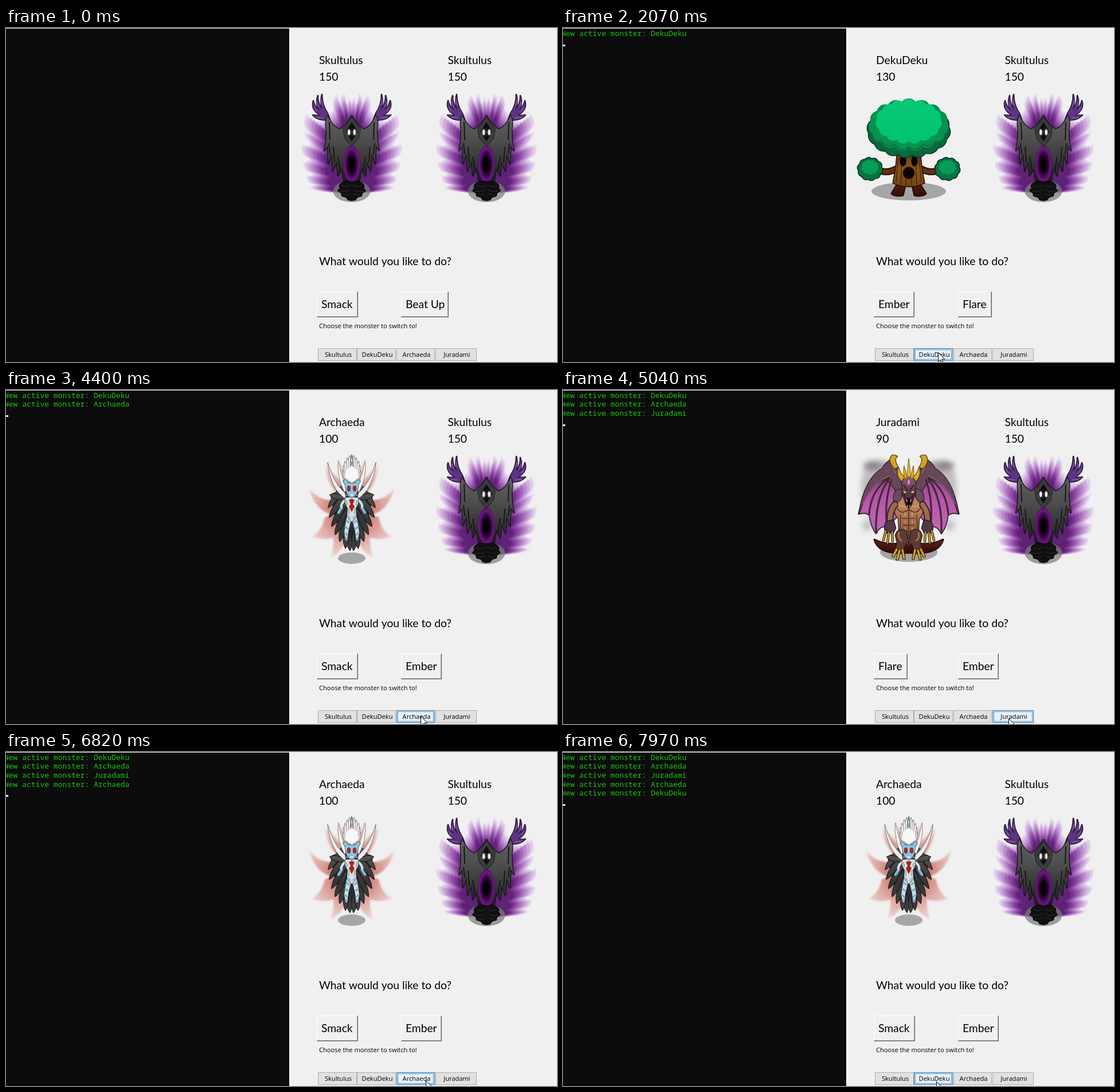
An HTML page with a canvas for the animation above (8000 ms loop, 961 by 583 pixels).

```html
<!DOCTYPE html>
<html lang="en">
<head>
<meta charset="utf-8">
<title>Monster battle</title>
<style>
html, body { margin: 0; width: 100%; height: 100%; overflow: hidden; background: #f0f0f0; }
canvas { display: block; }
</style>
</head>
<body>
<canvas id="stage" width="961" height="583"></canvas>
<script>
const ctx = document.getElementById('stage').getContext('2d');
const LOOP = 8000;
const UI = '19.25px Lato, Carlito, sans-serif';
const SMALL = '11.1px "Open Sans", "Noto Sans", sans-serif';
const MONO = '13px "Noto Sans Mono", "DejaVu Sans Mono", monospace';

const monsters = {
  Skultulus: { hp: 150, moves: [['Smack', 71], ['Beat Up', 82]] },
  DekuDeku: { hp: 130, moves: [['Ember', 70], ['Flare', 58]] },
  Archaeda: { hp: 100, moves: [['Smack', 71], ['Ember', 70]] },
  Juradami: { hp: 90, moves: [['Flare', 58], ['Ember', 70]] }
};

const tabs = [['Skultulus', 544, 68], ['DekuDeku', 612, 68], ['Archaeda', 681, 67], ['Juradami', 749, 72]];

// press, release (prints a line) and swap times
const picks = [
  ['DekuDeku', 690, 770, 920],
  ['Archaeda', 2760, 2840, 3010],
  ['Juradami', 4790, 4870, 5040],
  ['Archaeda', 6660, 6740, 6820],
  ['DekuDeku', 7890, 7970, 9000]
];

const blinks = [[5970, 6050], [7120, 7200]];

// time, x, y of the pointer
const pointer = [
  [70, 806, 582], [770, 657, 567], [920, 657, 567], [1140, 654, 566], [2070, 654, 566],
  [2460, 708, 571], [2610, 712, 571], [2840, 720, 569], [4320, 720, 569], [4870, 777, 573],
  [5890, 777, 573], [5970, 774, 572], [6430, 736, 573], [6660, 732, 573], [7120, 732, 573],
  [7890, 651, 575], [8000, 651, 575]
];

/* ---------- sprites ---------- */
let c;

// shape mirrored about the vertical axis, outline kept outside
function sym(d, fill, line, w = 1.6) {
  const half = new Path2D(d), p = new Path2D(d);
  p.addPath(half, new DOMMatrix([-1, 0, 0, 1, 0, 0]));
  c.lineJoin = c.lineCap = 'round';
  if (line) { c.strokeStyle = line; c.lineWidth = w * 2; c.stroke(p); }
  if (fill) { c.fillStyle = fill; c.fill(p); }
}

function strokes(d, color, w) { sym(d, null, color, w / 2); }

function oval(x, y, rx, ry, fill, line, w = 1.5) {
  c.beginPath();
  c.ellipse(x, y, rx, ry, 0, 0, 7);
  if (line) { c.strokeStyle = line; c.lineWidth = w * 2; c.stroke(); }
  c.fillStyle = fill;
  c.fill();
}

function ovals(x, ...rest) { oval(x, ...rest); oval(-x, ...rest); }

function ramp(y0, y1, ...colors) {
  const g = c.createLinearGradient(0, y0, 0, y1);
  colors.forEach((k, i) => g.addColorStop(i / (colors.length - 1), k));
  return g;
}

function glow(y, r, ...stops) {
  const g = c.createRadialGradient(0, y, 0, 0, y, r);
  stops.forEach(([at, k]) => g.addColorStop(at, k));
  return g;
}

// draws inside a frame scaled about (0, y)
function scaled(sx, sy, y, draw) {
  c.save();
  c.translate(0, y);
  c.scale(sx, sy);
  c.translate(0, -y);
  draw();
  c.restore();
}

// pointed leaf from a root to a tip
function leaf(x0, y0, x1, y1, w, fill, line) {
  const len = Math.hypot(x1 - x0, y1 - y0);
  const nx = (y0 - y1) / len * w, ny = (x1 - x0) / len * w;
  const mx = (x0 + x1 * 2) / 3, my = (y0 + y1 * 2) / 3;
  sym(`M${x0} ${y0}Q${mx + nx} ${my + ny} ${x1} ${y1}Q${mx - nx} ${my - ny} ${x0} ${y0}Z`, fill, line, .9);
}

// lumpy leaf mass
function cloud(x, y, rx, ry, n, r, fill, line) {
  const pass = (grow, color) => {
    oval(x, y, rx + grow, ry + grow, color);
    for (let i = 0; i < n; i++) {
      const a = (i + .25) / n * Math.PI * 2;
      oval(x + Math.cos(a) * rx, y + Math.sin(a) * ry, r + grow, r + grow, color);
    }
  };
  if (line) pass(1.6, line);
  pass(0, fill);
}

function blurred(px, draw) {
  c.save();
  c.filter = `blur(${px}px)`;
  draw();
  c.restore();
}

const art = {
  Skultulus() {
    const flame = 'M0 134Q-1 126 -5 121Q-4 128 -8 133Q-15 126 -12 115Q-22 122 -18 133Q-27 128 -25 117Q-36 128 -31 142L-46 160Q-65 168 -70 160Q-76 157 -77 151Q-90 169 -71 184Q-78 187 -82 180Q-81 193 -70 203Q-82 211 -86 203Q-90 223 -72 228Q-80 238 -84 234Q-84 253 -66 252Q-73 263 -78 258Q-77 275 -62 271Q-68 280 -74 277Q-68 287 0 287Z';
    const bands = ['#dfcbe9', '#ceaade', '#ba8bcb', '#a468b8', '#8d4ba3', '#763390', '#5e2276'];
    bands.forEach((color, i) => blurred(1, () =>
      scaled(1 - i * .072, 1 - i * .032, 287, () => sym(flame, color))));
    oval(0, 285, 32.5, 19, 'rgba(125,125,125,.72)');
    const claw = 'M-45 153Q-57 136 -52 116Q-52 135 -42 149ZM-47 154Q-66 138 -59 118Q-60 137 -43 150ZM-46 156Q-73 146 -67 127Q-64 143 -43 151ZM-38 160Q-58 163 -68 152Q-56 154 -42 149Z';
    sym(claw, '#5d3484', '#22142d', 1.3);
    strokes('M-53 127L-51 136M-61 129L-58 138M-65 139L-61 145M-61 156L-50 157', '#a075be', 1);
    sym('M0 153Q-9 170 -21 177Q-34 172 -42 153Q-47 160 -44 178Q-44 199 -48 214L-42 205L-41 237L-35 219L-33 250L-26 233L-24 258L-17 245L-13 270H0Z', ramp(153, 270, '#606060', '#505050', '#383838', '#191919'), '#161616', 1.4);
    strokes('M-39 165L-38 195M-40 202L-38 219M-32 208L-30 234M-24 225L-20 248', '#171717', 2);
    sym('M0 155Q-7 168 -15 176L-12 192L0 206Z', '#3c3c3c', '#202020', 1);
    sym('M0 164L-11 181L0 198Z', '#101010');
    blurred(1.5, () => ovals(-5, 182, 3.6, 6, '#666'));
    ovals(-4.8, 182, 2.1, 4.8, '#f4f4f4');
    scaled(.45, 1, 238, () =>
      oval(0, 238, 31, 31, glow(238, 31, [0, '#000'], [.38, '#0b020d'], [.65, '#3a0847'], [.85, '#64137a'], [1, '#741885']), '#4b095c', 1.4));
    sym('M0 269Q-10 266 -16 270Q-24 274 -20 279L-24 284L-18 288L-17 293L-10 295L-6 300L0 301Z', '#101010', '#050505', 1);
    strokes('M-17 275Q-9 280 -2 274M-20 284Q-10 288 -3 282M-14 291Q-8 293 -3 289', '#333', 1);
  },

  DekuDeku() {
    oval(0, 285, 65, 16, '#a5a5a5');
    sym('M-22 276L-30 289Q-22 295 -10 292L-6 274Z', ramp(274, 294, '#4e1d0c', '#2f0d05'), '#190702');
    const arm = 'M-22 246Q-36 254 -51 249';
    strokes(arm, '#220d04', 12);
    strokes(arm, '#65300f', 8);
    sym('M0 212H-20Q-20 238 -27 270Q-15 277 0 276Z', ramp(214, 277, '#67380f', '#8a561b', '#744312'), '#241004');
    strokes('M-18 226L-22 269M-11 215L-14 273M-5 265V275', 'rgba(55,24,5,.75)', 1.5);
    ovals(-10, 232, 5, 9, '#080402', '#39200a', 1);
    oval(0, 253, 9.5, 10, '#090402', '#3a1c07', 1);
    cloud(0, 178, 56, 32, 16, 16, '#08693b', '#073321');
    cloud(0, 169, 55, 31, 15, 15, '#08914f');
    cloud(0, 163, 46, 27, 15, 12, ramp(124, 203, '#08c878', '#00c46e'));
    strokes('M-66 193Q-58 203 -48 196Q-38 211 -25 203Q-14 218 0 208', '#086339', 1.3);
    for (const s of [-1, 1]) {
      cloud(s * 67.5, 246, 14.5, 12.5, 10, 7, '#087442', '#062f1d');
      cloud(s * 67.5, 243, 10, 8, 9, 5, '#079d58');
    }
  },

  Archaeda() {
    const red = glow(208, 90, [0, '#b0534a'], [.4, '#cf817a'], [.65, '#dfaaa4'], [1, '#ecd9d6']);
    blurred(1.5, () => {
      sym('M-3 192Q-28 162 -24 121Q-8 146 -4 182Z', red);
      sym('M-4 196Q-44 174 -46 132Q-27 147 -8 177Z', red);
      sym('M0 222Q-62 225 -74 172Q-56 196 -24 192Z', red);
      sym('M-6 243Q-36 268 -69 256Q-52 246 -47 222L-12 210Z', red);
      sym('M-3 248Q-19 288 -37 291Q-29 270 -33 246Z', red);
    });
    oval(0, 293.5, 24, 10, '#a6a6a6');
    sym('M0 185H-15Q-30 173 -37 184L-30 220L-19 250L0 262Z', '#2d2d2d');
    const feather = ramp(175, 280, '#555', '#343434', '#424242');
    for (const [x, y] of [[-3, 280], [-11, 276], [-21, 264], [-29, 252], [-35, 238], [-39, 222], [-41, 205]])
      leaf(-8, y - 46, x, y, 9, feather, '#111');
    leaf(-10, 190, -38, 183, 9, feather, '#111');
    sym('M-10 190Q-36 174 -42 127Q-32 162 -12 180Z', '#ededed', '#555', .7);
    sym('M-12 178Q-25 156 -23 124Q-19 151 -9 171Z', '#f5f5f5', '#666', .6);
    const arm = 'M-10 191Q-20 198 -18 206L-23 214';
    strokes(arm, '#3c4850', 6);
    strokes(arm, '#dce1e5', 4);
    strokes('M-19 207L-23 214', '#75b9dc', 4);
    sym('M0 218L-8 219L-11 235L-13 249L-11 260L-8 263L-6 247L-2 230H0Z', '#d2dce3', '#303943', .9);
    strokes('M-9 228L-5 231M-11 239L-7 242M-11 250L-8 253M-10 258V261', '#69afd5', 3);
    sym('M0 187L-11 188Q-13 198 -7 206L-8 221L0 230Z', '#d9dee2', '#3a4148', .9);
    strokes('M-10 193Q-6 199 -9 201M-5 207V216M-7 219L-2 224', '#709fb7', 1.5);
    sym('M0 190L-5 192L-2 199L-5 203L0 213Z', '#a9241d');
    sym('M0 155H-9L-15 159L-11 166Q-11 179 -4 186L0 188Z', '#89c6e5', '#344b5b', .8);
    for (const [x, y] of [[-15, 141], [-14, 132], [-12, 125], [-8, 119], [-4, 115], [0, 113]])
      leaf(x * .4, 162, x, y, 5, '#f9f9f9', '#777');
    sym('M0 132L-10 140L-12 153L-6 157L0 162Z', '#f7f7f7');
    ovals(-5, 172, 2.5, 4.5, '#b62820', '#513139', .7);
    oval(0, 183, 3.2, 2.3, '#c8e7f5', '#537d94', .5);
  },

  Juradami() {
    blurred(5, () => {
      ovals(-56, 132, 24, 9, 'rgba(75,75,75,.48)');
      ovals(-63, 170, 20, 45, 'rgba(90,80,90,.32)');
      ovals(-72, 236, 9, 10, 'rgba(80,80,80,.28)');
    });
    oval(0, 283, 50, 17, '#a5a5a5');
    sym('M-13 174Q-21 145 -29 134Q-69 146 -87 216Q-74 212 -68 219Q-66 237 -57 250Q-50 235 -36 238L-13 212Z', ramp(145, 245, '#8a427f', '#b758ab', '#bf66b5'), '#2c1930', 1.6);
    sym('M-10 178Q-16 146 -28 120Q-40 126 -46 137Q-77 155 -87 216Q-71 165 -41 155Q-27 164 -16 190Z', '#684758', '#291a29', 1.3);
    strokes('M-35 153Q-66 175 -69 217M-34 154Q-59 190 -57 248M-30 157Q-43 195 -38 237', '#442737', 3.2);
    strokes('M-34 150Q-67 164 -80 199M-32 126L-23 145', '#967084', 1.2);
    sym('M-24 137Q-38 124 -29 114Q-24 113 -20 116Q-27 120 -19 134Z', '#d2a423', '#443006', 1.1);
    sym('M0 284Q-52 289 -60 261Q-38 273 0 266Z', ramp(262, 284, '#641d12', '#2f0c09'), '#180606');
    sym('M0 186Q-19 184 -26 194Q-29 211 -18 225L-17 243L0 260Z', ramp(190, 260, '#c28b62', '#a87351', '#70472f'), '#321a13', 1.2);
    sym('M-12 173Q-28 174 -26 192Q-20 200 -13 189Z', '#6b4a59', '#281a25', 1.1);
    const arm = 'M-24 200Q-35 213 -32 235';
    strokes(arm, '#2d1a1f', 12);
    strokes(arm, '#9d6b4d', 8.5);
    sym('M-27 227L-39 230Q-45 242 -38 249L-27 249L-23 241Z', '#543848', '#211620', 1.3);
    const fingers = 'M-40 246L-44 262M-35 249L-37 267M-29 248L-28 264';
    strokes(fingers, '#2b1a0c', 4.5);
    strokes(fingers, '#cfa433', 2.3);
    strokes('M0 208Q-12 219 -20 207M0 224H-11M0 236H-10M0 247H-9M0 203V258M-14 218L-15 241', '#593625', 1.7);
    strokes('M-6 203Q-14 204 -18 200M-6 214V219M-6 229V232M-6 240V243', '#d7a176', 1.7);
    sym('M-4 247Q-18 238 -23 254L-20 267L-24 281L-12 285L-5 267L0 272Z', '#5d3a33', '#251517', 1.2);
    strokes('M-17 249Q-20 257 -13 263', '#a1724d', 3);
    const toes = 'M-21 278L-27 290M-16 280L-20 295M-11 279L-8 294';
    strokes(toes, '#392406', 5.5);
    strokes(toes, '#d1a62e', 3.1);
    sym('M-7 163Q-23 153 -18 135Q-15 149 -4 154Z', '#d9ac25', '#493107', 1);
    sym('M0 147L-8 154L-12 162L-10 184L-4 202H0Z', ramp(148, 200, '#8b6679', '#604150', '#3e2836'), '#251520', 1.1);
    sym('M0 120L-3 151H0Z', '#e1b832', '#594009', .7);
    sym('M-7 155Q-10 143 -8 133L-3 153Z', '#d7a822', '#594009', .7);
    strokes('M-9 166L-2 175M-8 182L-5 190', '#2c1723', 1.6);
    oval(0, 161, 2.2, 4.5, '#e47edb', '#71366e', .7);
    sym('M-10 175L-3 179L-8 180Z', '#ffdc4d', '#2b151b', .6);
    sym('M0 188Q-6 188 -5 195L-2 206H0Z', '#1e0b0d');
    strokes('M-4 191L-3 195M-2 204V201', '#e4d0aa', 1.2);
  }
};

const sprites = {};
for (const name in art) {
  const cv = document.createElement('canvas');
  cv.width = cv.height = 200;
  c = cv.getContext('2d');
  c.translate(100, -110);
  art[name]();
  sprites[name] = cv;
}

/* ---------- interface ---------- */
function box(x, y, w, h, color) {
  ctx.fillStyle = color;
  ctx.fillRect(x, y, w, h);
}

function text(s, x, y, font, color = '#000', align = 'left') {
  ctx.font = font;
  ctx.fillStyle = color;
  ctx.textAlign = align;
  ctx.fillText(s, x, y);
}

function moveButton(x, [label, w]) {
  box(x, 460, w + 1, 45, '#696969');
  box(x, 460, w, 44, '#fff');
  box(x + 1, 461, w - 1, 43, '#a0a0a0');
  box(x + 1, 461, w - 2, 42, '#f0f0f0');
  text(label, x + 8, 489, UI);
}

function tabButton([name, x, w], hover, pressed, focus) {
  const down = hover && pressed;
  box(x, 559, w, 22, down ? '#005499' : hover ? '#0078d7' : '#adadad');
  box(x + 1, 560, w - 2, 20, down ? '#cce4f7' : hover ? '#e5f1fb' : '#e1e1e1');
  if (focus) {
    ctx.strokeStyle = '#222';
    ctx.lineWidth = 1;
    ctx.setLineDash([1, 1]);
    ctx.strokeRect(x + 2.5, 561.5, w - 5, 17);
    ctx.setLineDash([]);
  }
  text(name, x + w / 2 + 1.5, 574, SMALL, '#000', 'center');
}

function card(name, x, cx, visible) {
  text(name, x, 62.5, UI);
  text(monsters[name].hp, x, 92, UI);
  if (visible) ctx.drawImage(sprites[name], cx - 100, 110);
}

function pointerAt(t) {
  if (t < pointer[0][0]) return null;
  const i = pointer.findIndex(p => p[0] > t);
  const [t0, x0, y0] = pointer[i - 1], [t1, x1, y1] = pointer[i];
  let k = (t - t0) / (t1 - t0);
  k = k * k * (3 - 2 * k);
  return [Math.round(x0 + (x1 - x0) * k), Math.round(y0 + (y1 - y0) * k)];
}

const arrow = new Path2D('M.5 .5V16.5L4.2 13L6.8 18.8L9 17.8L6.5 12.2H11.8Z');

function draw(t) {
  let active = 'Skultulus', focus = null, pressed = false;
  const log = [];
  for (const [name, press, release, swap] of picks) {
    if (t >= press) focus = name;
    if (t >= press && t < release) pressed = true;
    if (t >= release) log.push(name);
    if (t >= swap) active = name;
  }

  box(0, 0, 961, 583, '#f0f0f0');
  box(0, 1, 494, 582, '#0c0c0c');
  box(494, 0, 1, 583, '#fff');
  log.forEach((name, i) => text('New active monster: ' + name, -3, 13.7 + i * 15.6, MONO, '#16c60c'));
  if (log.length) box(0, Math.round(13 + log.length * 15.6), 4, 3, '#f2f2f2');

  card(active, 546, 603, !blinks.some(([a, b]) => t >= a && t < b));
  card('Skultulus', 770.5, 838, true);
  text('What would you like to do?', 546, 414, UI);
  text('Choose the monster to switch to!', 546, 523.5, SMALL);
  monsters[active].moves.forEach((m, i) => moveButton(542 + i * 147, m));

  const at = pointerAt(t);
  for (const tab of tabs) {
    const [name, x, w] = tab;
    const hover = at && at[0] >= x && at[0] < x + w && at[1] >= 559 && at[1] < 581;
    tabButton(tab, hover, pressed, focus === name);
  }
  if (at) {
    ctx.save();
    ctx.translate(...at);
    ctx.fillStyle = '#fff';
    ctx.fill(arrow);
    ctx.strokeStyle = '#000';
    ctx.lineWidth = 1;
    ctx.stroke(arrow);
    ctx.restore();
  }
}

const start = performance.now();
function tick() {
  draw((performance.now() - start) % LOOP);
  requestAnimationFrame(tick);
}
tick();
</script>
</body>
</html>
```
